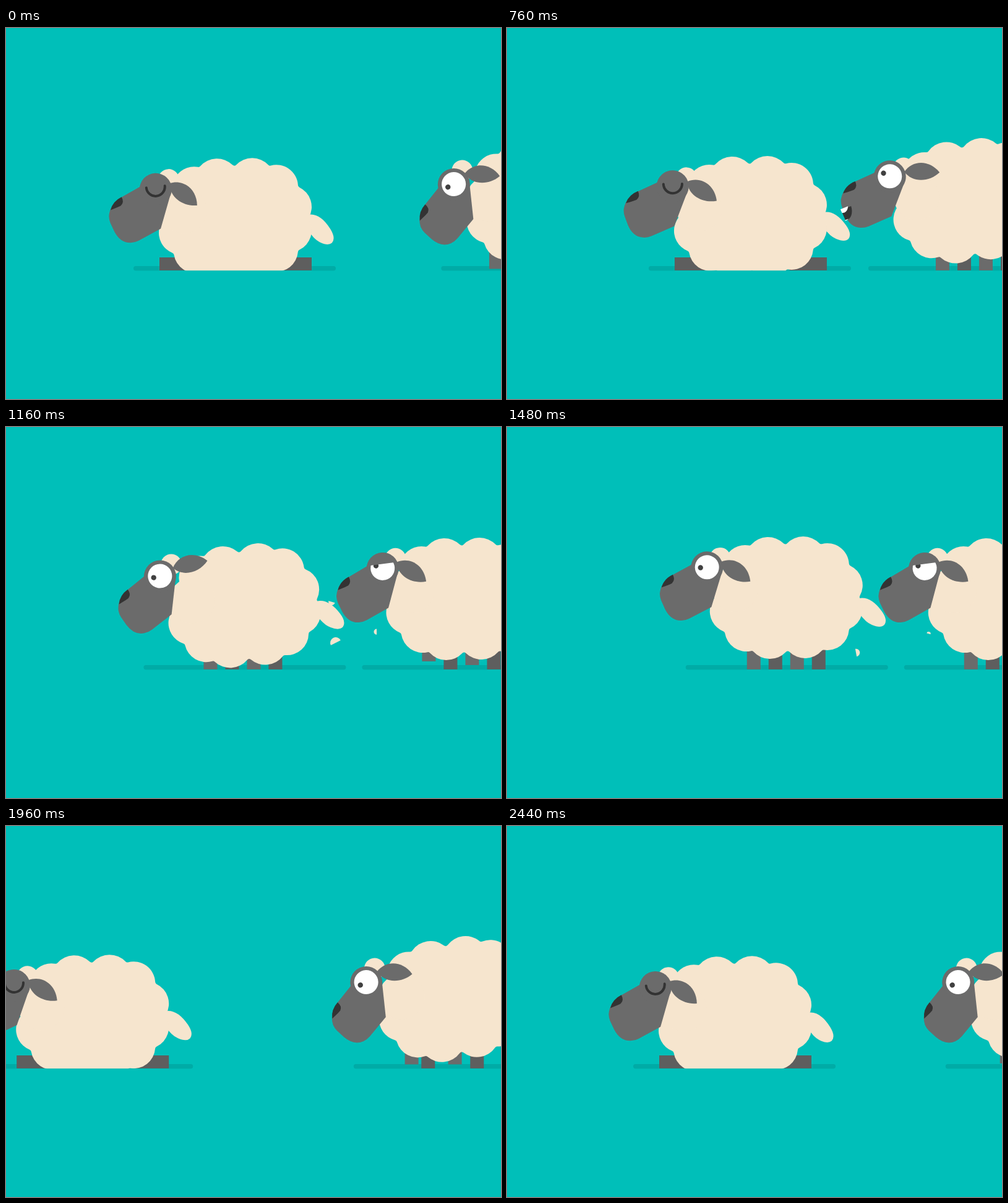
Write an HTML page that moves like this. It is 800x600 px and loops after 2480 ms.

```html
<!DOCTYPE html>
<html lang="en">
<head>
<meta charset="utf-8">
<title>Sheep queue</title>
<style>
html, body { margin: 0; width: 100%; height: 100%; overflow: hidden; background: #00bfb9; }
svg { display: block; width: 100vw; height: 100vh; }
</style>
</head>
<body>
<svg id="stage" viewBox="0 0 800 600">
  <clipPath id="floor"><rect x="-200" y="-100" width="900" height="492.3"/></clipPath>
</svg>
<script>
const LOOP = 2480, STEP = 40, WAKE = 820;
const WOOL = '#f6e5ce', GREY = '#6b6b6b', DARK = '#5e5e5e', INK = '#333';
const stage = document.getElementById('stage');

function add(parent, tag, attrs) {
  const el = document.createElementNS('http://www.w3.org/2000/svg', tag);
  for (const k in attrs) el.setAttribute(k, attrs[k]);
  return parent.appendChild(el);
}
const path = (parent, d, fill) => add(parent, 'path', { d, fill });
const move = (el, s) => el.setAttribute('transform', s);
const show = (el, on) => el.setAttribute('display', on ? 'inline' : 'none');

const lin = (t, a, b) => Math.min(1, Math.max(0, (t - a) / (b - a)));
const ease = (t, a, b) => { const u = lin(t, a, b); return u * u * (3 - 2 * u); };
const bump = (t, a, b) => Math.sin(Math.PI * lin(t, a, b));

// Outline of overlapping circles with softened notches.
function fleece(circles, f) {
  const n = circles.length;
  const joins = circles.map(([ax, ay, a], i) => {
    const [bx, by, b] = circles[(i + 1) % n];
    const dx = bx - ax, dy = by - ay, d = Math.hypot(dx, dy);
    const u = (d * d + (a + f) ** 2 - (b + f) ** 2) / (2 * d);
    const h = Math.sqrt((a + f) ** 2 - u * u);
    const fx = ax + (dx * u + dy * h) / d, fy = ay + (dy * u - dx * h) / d;
    const touch = (x, y, r) => [x + (fx - x) * r / (r + f), y + (fy - y) * r / (r + f)];
    return [touch(ax, ay, a), touch(bx, by, b)];
  });
  return 'M' + joins[n - 1][1] + circles.map((c, i) =>
    `A${c[2]} ${c[2]} 0 0 1 ${joins[i][0]}A${f} ${f} 0 0 0 ${joins[i][1]}`).join('') + 'Z';
}

const BODY = fleece([
  [96, 226, 35], [133, 214, 36], [190, 213, 36], [229, 223, 35], [251, 256, 35], [251, 294, 35],
  [229, 326, 35], [193, 338, 36], [136, 339, 36], [98, 328, 35], [74, 298, 35]
], 4);

// How far the view has panned: slow drift, a pull, then a quick sweep.
function pan(t) {
  const n = Math.floor(t / LOOP), s = t - n * LOOP;
  return 654 * n + 35 * lin(s, 0, 1160) + 130 * ease(s, 1100, 1850)
    + 489 / (1 + Math.exp((1950 - s) / 89));
}

// How far a sheep has come: startled hop, walk, small lunge after the bite.
const travel = t => 21 * ease(t, WAKE, 1000) + 36 * bump(t, WAKE, 1140)
  + 278 * lin(t, 1600, 3200) ** 1.2 + 23 * ease(t, 3300, 3600);

const pose = (y, lean, head, neck, ear, tail, foot, look) => ({ y, lean, head, neck, ear, tail, foot, look });
const dozing = t => {
  const b = (1 - Math.cos(2 * Math.PI * (t + 40) / 1640)) / 2;
  return pose(33.3 - 3.3 * b, 0, 5 * b - 2, 0, 38 - 6 * b, 4 - 4 * b, 97, 0);
};
const leap = pose(-50, 4, 10, 0, 30, -14, 97, 0);
const land = pose(14, -4, -11.5, -10, -13, 2, 97, 0);
const stand = pose(0, 0, -1, 0, 33, 0, 99, 0);
const stride = pose(6, -7, -24, -1, 3, 0, 99, 0);
const bite = pose(5, -5.5, 3, 0, 0, 0, 109, -5);
const grumpy = pose(2, 0, -3, -1, 32, 0, 97, -5);
const changes = [
  [WAKE, 960, leap], [960, 1160, land], [1160, 1480, stand],
  [1480, 1900, stride], [2960, 3240, bite], [3300, 3640, grumpy]
];

function poseAt(t) {
  const p = dozing(Math.min(t, WAKE));
  for (const [a, b, to] of changes) {
    const e = ease(t, a, b);
    for (const k in p) p[k] += (to[k] - p[k]) * e;
  }
  return p;
}

const FRONT = [75, 93, 145, 172];

function makeSheep() {
  const root = add(stage, 'g', {});
  add(root, 'rect', { x: 0, y: 385, width: 327, height: 7.5, rx: 3.7, fill: '#00aba6' });
  const legs = FRONT.map((_, i) =>
    add(root, 'rect', { y: 345, width: 22, height: 47, fill: i % 2 ? DARK : GREY }));
  const folded = path(root, 'M42 371H102V392H42ZM228 371H288V392H228Z', DARK);
  const torso = add(add(root, 'g', { 'clip-path': 'url(#floor)' }), 'g', {});
  const tail = path(torso, 'M-10-13L7-13Q26-17 44 8Q54 22 48 30Q42 36 28 30Q18 26 8 12L-10 10Z', WOOL);
  path(torso, BODY, WOOL);
  add(torso, 'circle', { cx: 80, cy: 262, r: 37, fill: WOOL });

  const head = add(torso, 'g', {});
  add(head, 'circle', { cx: 21.5, cy: -15, r: 17, fill: WOOL });
  path(head, 'M-8-14L-54 10Q-75 21-77 41Q-77 47-75 52L-69 66Q-60 85-43 85Q-36 85-30 82L6 64L26 2Z', GREY);
  add(head, 'circle', { r: 26, fill: GREY });
  path(head, 'M-74 31Q-70 17-55.5 10.5Q-51 19-57 24.5Q-59 26-74 31Z', INK);
  const mouth = add(head, 'g', {});
  path(mouth, 'M-76 58L-60 51Q-57 59-59 66Q-61 73-68 74Z', INK);
  path(mouth, 'M-77 57L-65 51.5Q-65 59-70 62L-74 63ZM-69 74.5L-63 71.5Q-65 74-68 75Z', '#fff');
  const shut = add(head, 'path', {
    d: 'M-15-3A15 15 0 0 0 15-5', fill: 'none', stroke: INK, 'stroke-width': 4, 'stroke-linecap': 'round'
  });
  const open = add(head, 'g', {});
  add(open, 'circle', { r: 19.5, cy: -0.5, fill: '#fff' });
  const pupil = add(open, 'circle', { cx: -10.5, r: 4.2, fill: '#404040' });
  const lid = path(open, 'M-19.5-6A20.5 20.5 0 0 1 19-9Z', GREY);
  const ear = path(head, 'M0 0C13-19 40-20 57 1C40 17 13 18 0 0Z', GREY);

  return t => {
    const p = poseAt(t), awake = t >= WAKE;
    const sleep = 1 - ease(t, WAKE, WAKE + 80);
    const walk = ease(t, 1560, 1680) - ease(t, 3080, 3180);
    move(root, `translate(${206 + pan(t) - travel(t)} 0)`);
    move(torso, `translate(${2 * sleep} ${p.y}) rotate(${p.lean} 145 285)`);
    move(tail, `translate(273 ${290 - 9 * sleep}) rotate(${p.tail})`);
    move(head, `translate(51 ${260 + p.neck}) rotate(${p.head - p.lean}) translate(-16 -33)`);
    move(ear, `translate(23 -9) rotate(${p.ear - p.head})`);
    pupil.setAttribute('cy', p.look);
    show(folded, !awake);
    show(shut, !awake);
    show(open, awake);
    show(mouth, t >= 3140 && t < 3300);
    show(lid, t >= 3400);
    legs.forEach((leg, i) => {
      show(leg, awake);
      const turn = ((t - 1740) / 250 + 20 - (i % 2) / 2) % 1;
      const swing = Math.max(0, (turn - 0.6) / 0.4);
      const step = FRONT[i] + 26 * (swing ? 1 - swing : turn / 0.6);
      const rest = p.foot + 35 * i;
      const stamp = i % 2 ? 0 : bump(t, 3540, 3740) * (13 - 3 * i);
      const lift = 8 * Math.sin(Math.PI * swing) * walk + stamp + Math.max(0, -p.y);
      move(leg, `translate(${rest + (step - rest) * walk} ${-lift})`);
    });
  };
}

const biter = makeSheep(), sleeper = makeSheep(), next = makeSheep();

// Tufts torn off by the bite drift, spin and shrink.
const tufts = [
  { x: 556, y: 333, vx: -0.11, vy: 0.05, turn: -132, size: 11.5 },
  { x: 540, y: 270, vx: -0.08, vy: 0.04, turn: 91, size: 7 },
  { x: 571, y: 328, vx: 0.05, vy: 0.01, turn: -196, size: 6 }
];
for (const f of tufts) f.el = path(stage, 'M-1 0A1 1 0 0 1 1 0Z', WOOL);

function draw(t) {
  biter(t + LOOP);
  sleeper(t);
  next(t - LOOP);
  const age = t - 840, slide = pan(t) - pan(840);
  for (const f of tufts) {
    show(f.el, age >= 0 && age < 1300);
    move(f.el, `translate(${f.x + f.vx * age + slide} ${f.y + f.vy * age})
      rotate(${f.turn + 0.33 * age}) scale(${f.size * (1 - age / 1400)})`);
  }
}

const start = performance.now();
function tick(now) {
  const t = Math.max(0, now - start) % LOOP;
  draw(Math.floor(t / STEP) * STEP);
  requestAnimationFrame(tick);
}
draw(0);
requestAnimationFrame(tick);
</script>
</body>
</html>
```
